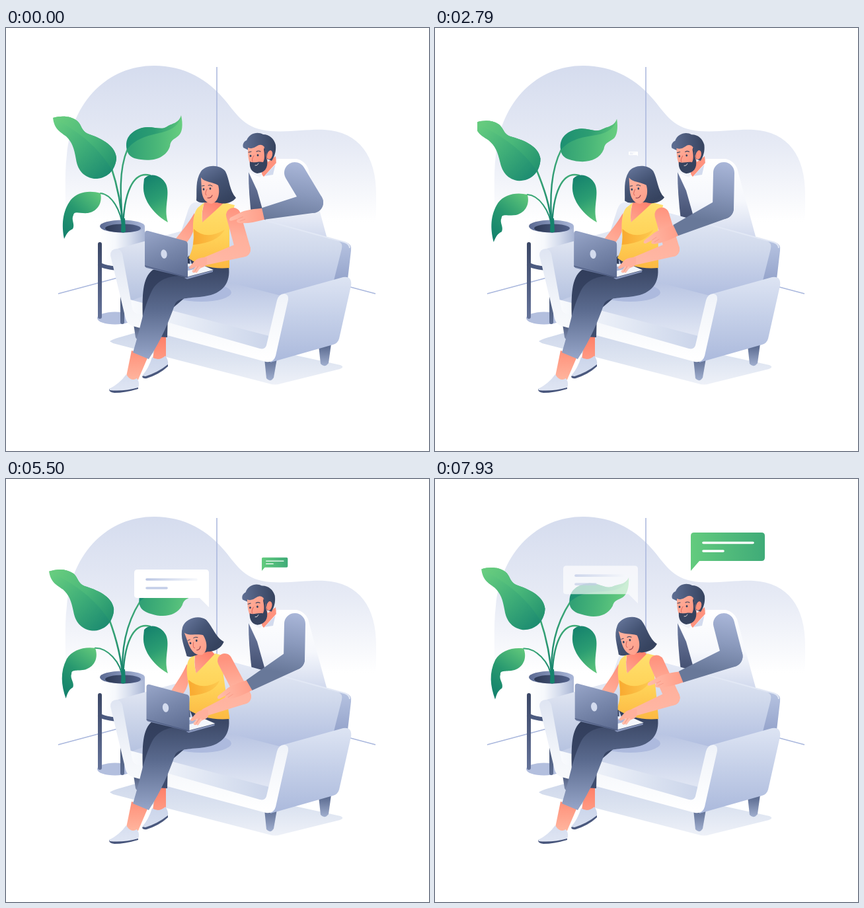
Write an HTML page with a canvas that moves like this. It is 640 px wide and 640 px high and loops after 8 s.

```html
<!DOCTYPE html>
<html lang="en">
<head>
<meta charset="utf-8">
<title>Working from the sofa</title>
<style>
  html, body { margin: 0; width: 100%; height: 100%; overflow: hidden; background: #fff; }
  canvas { display: block; width: 640px; height: 640px; }
</style>
</head>
<body>
<canvas id="stage" width="640" height="640"></canvas>
<script>
const ctx = document.getElementById('stage').getContext('2d');
const LOOP = 8000;
const NAVY = '#36435f', SLATE = '#5f6f94', SKIN = '#ffb09c', BLUSH = '#ff937e';

const smooth = p => (1 - Math.cos(Math.PI * p)) / 2;
const linear = p => p;

// Value of a keyed track at time t; keys are [time, value].
function track(t, keys, ease = smooth) {
  if (t <= keys[0][0]) return keys[0][1];
  for (let i = 1; i < keys.length; i++) {
    const [t0, a] = keys[i - 1], [t1, b] = keys[i];
    if (t <= t1) return a + (b - a) * ease((t - t0) / (t1 - t0));
  }
  return keys[keys.length - 1][1];
}

function grad(x0, y0, x1, y1, ...colors) {
  const g = ctx.createLinearGradient(x0, y0, x1, y1);
  colors.forEach((c, i) => g.addColorStop(i / (colors.length - 1), c));
  return g;
}

const fall = (y0, y1, ...colors) => grad(0, y0, 0, y1, ...colors);
const across = (x0, x1, ...colors) => grad(x0, 0, x1, 0, ...colors);

function fill(path, paint) {
  ctx.fillStyle = paint;
  ctx.fill(new Path2D(path));
}

function line(path, paint, width, cap = 'round') {
  ctx.strokeStyle = paint;
  ctx.lineWidth = width;
  ctx.lineCap = cap;
  ctx.lineJoin = 'round';
  ctx.stroke(new Path2D(path));
}

function oval(x, y, rx, ry, paint, turn = 0) {
  ctx.fillStyle = paint;
  ctx.beginPath();
  ctx.ellipse(x, y, rx, ry, turn, 0, 7);
  ctx.fill();
}

function group(draw) {
  ctx.save();
  draw();
  ctx.restore();
}

function turned(x, y, angle, draw) {
  group(() => {
    ctx.translate(x, y);
    ctx.rotate(angle);
    ctx.translate(-x, -y);
    draw();
  });
}

// Tapered limb through joints given as [x, y, radius].
function limb(joints, paint, flatEnd = false) {
  ctx.fillStyle = paint;
  for (let i = 1; i < joints.length; i++) {
    const [x0, y0, r0] = joints[i - 1], [x1, y1, r1] = joints[i];
    const a = Math.atan2(y1 - y0, x1 - x0), q = Math.PI / 2;
    ctx.beginPath();
    ctx.arc(x0, y0, r0, a + q, a + 3 * q);
    if (flatEnd && i === joints.length - 1) {
      ctx.lineTo(x1 + r1 * Math.sin(a), y1 - r1 * Math.cos(a));
      ctx.lineTo(x1 - r1 * Math.sin(a), y1 + r1 * Math.cos(a));
    } else {
      ctx.arc(x1, y1, r1, a - q, a + q);
    }
    ctx.fill();
  }
}

function room() {
  fill('M90 295C91 260 88 225 92 192C100 110 155 57 224 57C270 57 306 78 332 110C350 132 362 153 400 156C430 158 455 153 482 154C535 157 560 195 560 250L560 295Z',
    fall(57, 293, '#d5dcee', '#e6eaf5', '#ffffff'));
  line('M319 59V300M79 402L180 375M510 389L559 402', '#a9b7dd', 1.5, 'butt');
  fill('M157 474C165 468 185 466 230 450L506 510Q513 513 505 516L416 538Q407 541 398 538L162 477Z',
    fall(460, 540, '#cfd8eb', '#dde4f1', '#eef1f8'));
}

function pot() {
  oval(165, 439, 27, 9.5, '#b3bfde');
  line('M176 362V445', fall(360, 448, NAVY, SLATE), 6);
  line('M142 358Q154 364 180 364', '#4b5a80', 6);
  fill('M142 300V353Q156 361 176 361Q200 360 210 352V300Z', across(142, 212, '#ffffff', '#f6f8fc', '#d3dbec', '#a5b2d2'));
  line('M142 327V437', fall(325, 440, '#3b4766', '#647299'), 6);
  oval(176, 300, 34, 9.5, across(142, 210, '#5a6992', '#8492b6', '#a9b6d8'));
  oval(177, 303, 27, 6.5, across(150, 205, '#2d3954', '#52618a'));
}

const ROOT = { x: 178, y: 308 };

// Stem whose upper end swings about the root while its foot stays put.
function stem(tip, bend, low, angle, width = 2.4) {
  const swing = ([x, y]) => {
    const dx = x - ROOT.x, dy = y - ROOT.y, c = Math.cos(angle), s = Math.sin(angle);
    return [ROOT.x + dx * c - dy * s, ROOT.y + dx * s + dy * c];
  };
  line(`M${swing(tip)}C${swing(bend)} ${low} 177 304`, fall(tip[1], 300, '#3fab77', '#13806c'), width);
}

function plant(t) {
  const grow = track(t, [[0, 0], [7000, 1], [9000, .97]]);
  const sway = track(t, [[0, 0], [3600, -.077], [7300, .004], [8000, -.005]]);
  const droop = -.165 * grow, lift = .17 * grow;
  const leaf = (angle, draw) => turned(ROOT.x, ROOT.y, angle, draw);

  stem([143, 250], [160, 252], [174, 275], droop, 2);
  leaf(droop, () => {
    fill('M88 319C84 298 85 278 98 260C108 248 126 245 143 250C146 263 140 277 124 280C111 281 103 276 102 283C98 290 105 297 101 304C94 307 92 311 88 319Z',
      grad(86, 315, 144, 255, '#12806c', '#27986f', '#5ec57a'));
  });

  stem([184, 183], [170, 215], [173, 255], lift);
  leaf(lift, () => {
    fill('M184 188C179 170 188 156 206 151C222 147 234 156 244 149C252 144 262 144 265 132C268 146 267 158 261 163C254 169 249 169 248 179C242 197 222 202 204 199C194 198 187 195 184 188Z',
      across(183, 267, '#2f9f74', '#48b578', '#68ce80'));
    fill('M183 184C179 168 188 156 206 151C222 147 234 156 244 149C252 144 262 144 265 132C263 146 252 154 236 158C212 163 195 168 183 184Z',
      across(183, 266, '#1d9072', '#2c9d72', '#5bc47b'));
  });

  stem([159, 210], [169, 240], [175, 270], sway, 2.6);
  group(() => {
    ctx.beginPath();
    ctx.rect(64, 60, 300, 300);
    ctx.clip();
    leaf(sway, () => {
      const top = 'M71 136C84 132 98 133 107 140C115 146 113 155 124 160C141 166 165 176 167 196';
      fill(top + 'C166 218 150 229 133 228C115 225 108 212 106 199C103 181 100 173 91 164C80 156 73 152 71 136Z',
        grad(78, 135, 155, 225, '#68ce80', '#3fae78', '#1b8a70'));
      fill(top + 'C167 204 164 209 160 214C146 191 122 162 71 136Z',
        grad(85, 133, 165, 205, '#66cb7e', '#4ab87a', '#24946f'));
    });
  });

  stem([218, 223], [192, 216], [178, 250], 0);
  fill('M209 228C219 217 236 224 242 236C249 252 238 272 245 294C227 284 206 262 208 238Z',
    grad(210, 226, 246, 292, '#15826d', '#2b9d72', '#60c77c'));
  fill('M174 308L175 288L180 288L181 308Q177 311 174 308Z', '#15836d');
}

function manBody() {
  fill('M367 218L384 226L410 198L440 198Q452 201 457 212L489 330H385L372 270Z',
    fall(200, 325, '#ffffff', '#f5f7fc', '#ccd5eb'));
  fill('M367 218L380 246L393 292L372 290Q367 250 367 218Z', fall(218, 290, '#6f7da2', '#434f70'));
  fill('M393 205L408 194L409 204L390 225Q386 222 387 215Z', BLUSH);
  fill('M410 196L404 222L391 224L408 206Z', '#d3dbee');
}

function manHead(t) {
  const tilt = track(t, [[1500, 0], [2790, -.02], [3700, -.075], [5500, -.04], [6790, -.018], [7900, 0]]);
  turned(398, 208, tilt, () => {
    fill('M359 181C357 175 361 171 364 170C368 159 381 156 389 161C399 161 406 168 408 177C409 187 406 195 402 201L392 197Z',
      across(358, 408, SLATE, NAVY));
    fill('M366 181Q372 184 379 179Q386 174 391 180L397 206L370 207C366 198 366 190 366 181Z', grad(366, 180, 394, 205, SKIN, BLUSH));
    oval(399, 192, 4, 7, BLUSH, .25);
    fill('M391 180C394 188 393 196 395 200C397 212 391 219 380 220C371 218 368 211 369 202C374 205 383 201 389 203C392 198 391 190 390 184Z', NAVY);
    line('M377 208Q380 209 382 205', '#f6e3e0', .9);
    line('M375 193Q371 199 373 202', '#d8655c', 1);
    line('M367 188L371 187M379 187Q382 185 385 187', NAVY, 1.1);
    oval(370, 193.5, 1.4, 1.7, NAVY);
    oval(381, 192.5, 1.4, 1.7, NAVY);
  });
}

function sofa() {
  fill('M391 500L410 500L405 529Q400 537 394 530Z', fall(500, 534, '#5f6f94', '#a2b0d0'));
  fill('M473 480L492 478L488 507Q482 515 476 508Z', fall(483, 512, '#5f6f94', '#a2b0d0'));
  fill('M193 448L206 450L201 470Q198 473 196 468Z', fall(450, 472, '#4d5b7e', '#8492b4'));
  fill('M490 318L514 324Q524 327 522 337L517 380L494 390Z', fall(325, 385, '#b5c2e0', '#93a2ca'));
  fill('M258 330L276 274Q280 261 292 264L502 322Q510 325 508 334L494 390L413 408L250 366Z',
    fall(265, 405, '#e9edf7', '#d0d9ec', '#b1bee0'));
  line('M292 264L512 324Q519 326 520 332', '#e2e8f5', 2);
  fill('M185 405L250 362L416 405L400 468L190 413Z', fall(375, 462, '#b4c0e0', '#c9d3ea', '#dfe5f3'));
  fill('M165 335L270 306L262 385L188 413Z', fall(315, 412, '#e2e7f3', '#b6c3e0'));
  fill('M188 411L402 467L394 488L186 434Z', across(190, 398, '#f8fafd', '#e2e8f4', '#cbd5ea'));
  oval(295, 400, 46, 14, '#adbade');
  fill('M420 402L510 377Q524 375 522 390L504 470Q502 477 495 479L400 506Z', fall(377, 500, '#dde4f3', '#c4cfe8', '#adbbdd'));
  fill('M158 344Q158 334 168 334Q174 335 176 342L191 424Q192 430 198 432L384 485Q392 487 394 480L410 412Q413 402 421 402Q428 403 427 411L408 496Q405 507 393 505L192 451Q183 448 181 440Z',
    fall(334, 500, '#dfe5f2', '#f2f5fa', '#ffffff'));
}

function legs() {
  const shoe = fall(500, 548, '#ccd6eb', '#dfe5f3');
  const ankle = fall(465, 530, '#ff7d66', '#ffb39c');
  fill('M228 464L242 465L242 498Q234 506 222 500Z', ankle);
  fill('M206 527L245 507L245 512Q232 524 213 530Q207 531 206 527Z', '#4a587d');
  fill('M206 526Q216 515 221 498Q231 505 241 496Q246 502 245 509Q230 521 211 527Z', shoe);
  fill('M190 488L215 497L200 532Q190 536 182 527Z', ankle);
  fill('M156 546L200 541L200 546Q180 552 164 552Q155 551 156 546Z', '#46547a');
  fill('M156 546Q172 538 182 524Q189 536 198 530Q203 537 200 544Q178 550 157 548Z', shoe);
  fill('M207 440C206 405 206 378 222 366L278 345L280 400L245 430L244 468L226 467Z', fall(350, 468, '#2f3b58', '#3f4d6f'));
  fill('M276 344Q300 362 337 361C340 385 329 402 300 406C280 409 262 407 256 417C246 445 236 470 216 501L192 491C205 450 207 425 221 397C230 380 248 374 270 375L283 362Z',
    fall(350, 500, '#323e5b', '#5a6a8e', '#96a5c8'));
}

function laptop(lean) {
  group(() => {
    ctx.translate(2.5 * lean, 4 * lean);
    fill('M270 378L313 367V369L274 380Z', '#8997bd');
    fill('M272 377L314 366L298 359L272 356Z', '#f3f6fb');
    fill('M272 368L292 363L284 360L272 361Z', '#a9b6d8');
    fill('M210 311Q210 306 215 307L271 322Q275 323 275 328V378L213 363Q210 362 210 359Z',
      grad(225, 308, 255, 380, '#93a1c4', '#7786aa', '#5e6d92'));
    line('M210.5 360L274 377', '#4c5a80', 1.2);
    oval(239, 342, 4.6, 6.8, '#d3dbee', -.15);
  });
}

function womanTorso(lean) {
  const slant = .142 * lean;
  group(() => {
    ctx.transform(1, 0, slant, 1, -360 * slant, 0);
    fill('M285 280C276 296 265 308 256 320L270 328C279 320 284 308 286 298Z', grad(284, 285, 260, 325, BLUSH, SKIN));
    fill('M302 258L322 256L330 266L297 296Q295 276 302 258Z', grad(320, 262, 298, 292, '#ff816d', '#ffa48f'));
    fill('M290 272L300 264Q295 278 297 294Q312 281 330 264L346 268L338 295V363Q300 366 276 348Q286 330 283 306Q282 282 290 272Z',
      fall(265, 363, '#ffdf6e', '#ffd358', '#fcb943'));
    fill('M284 304Q303 322 331 305Q320 325 283 328Q285 316 284 304Z', across(284, 330, '#f9aa31', '#fdca50'));
  });
}

function womanArm(t, lean) {
  const shoulder = [344 - 13 * lean, 283 - 8 * lean, 11];
  const elbow = [358.5 + lean, 335 - 6 * lean, 11.5];
  limb([shoulder, elbow, [301, 353, 6]], grad(shoulder[0], 272, 335, 355, BLUSH, SKIN, '#ffb7a4'));
  const tap = Math.sin(t / 110) * .8;
  group(() => {
    ctx.translate(2 * lean, 2 * lean);
    fill('M304 347Q290 346 284 354L277 362Q277 365 281 364L287 361L282 369Q284 372 288 368L295 363Q304 360 304 356Z', SKIN);
    line(`M288 362L283 ${368 + tap}M293 362L288 ${369 - tap}`, '#ffc0ae', 3);
    line(`M290 361L286 ${367 + tap}`, '#ee8d7c', .7);
  });
}

function womanHead(lean) {
  group(() => {
    ctx.translate(312 - 13.5 * lean, 268 - .5 * lean);
    ctx.rotate(-.3 * lean);
    ctx.translate(-312, -268);
    fill('M288 261C289 246 286 231 295 217C303 206 324 206 332 217C338 228 338 247 348 257C341 266 328 267 320 264L300 264Q293 265 288 261Z',
      grad(300, 208, 330, 262, '#65759a', '#445373', NAVY));
    fill('M295 226C299 233 313 233 321 238C324 248 322 263 311 266C301 265 297 256 296 246Z', grad(297, 235, 320, 262, SKIN, '#ffa08b'));
    line('M304 244Q300 251 303 253', '#d8655c', 1);
    line('M305 257Q310 258 312 253', '#96434c', 1.1);
    line('M296.5 239L300 238.5M306 238Q309 236.5 312 239', NAVY, 1);
    oval(299, 244, 1.4, 1.7, NAVY);
    oval(309, 243, 1.4, 1.7, NAVY);
  });
}

function manArm(t) {
  const at = (...keys) => track(t, keys);
  const ex = at([0, 464], [2650, 436], [6800, 436], [9000, 462]);
  const ey = at([0, 264], [2650, 273], [6800, 273], [9000, 264]);
  const wx = at([0, 389], [2700, 364], [3650, 371], [5500, 368], [6750, 365], [9200, 380]);
  const wy = at([0, 281], [2700, 306], [3650, 314], [5500, 312], [6750, 306], [9200, 292]);
  const aim = at([0, -.12], [1290, -.15], [2790, -.31], [3650, -.43], [5500, -.33], [6790, -.31], [8200, -.16]);
  group(() => {
    ctx.translate(wx, wy);
    ctx.rotate(aim);
    fill('M6 -8C-14 -9 -27 -9 -36 -5L-50 0Q-54 4 -49 5L-38 3Q-45 8 -36 10Q-20 13 6 8Z', across(-50, 4, '#ffbba8', '#ff9d88'));
    line('M-38 3L-31 1M-36 7L-28 5', '#f79482', .7);
  });
  limb([[437, 219, 16], [ex, ey, 16], [wx, wy, 9]], grad(440, 204, 425, 294, '#a9b6d8', '#8a99bc', '#687899'), true);
}

function popScale(u) {
  return track(u, [[0, .05], [370, .35], [870, .808], [1200, 1.03], [1400, 1.062], [1660, 1.045], [2300, 1]], linear);
}

function bubble(x, y, scale, draw) {
  group(() => {
    ctx.translate(x, y);
    ctx.scale(scale, scale);
    draw();
  });
}

function bubbles(t) {
  if (t > 2700) {
    const leave = track(t, [[7600, 0], [8400, 1]]);
    ctx.globalAlpha = 1 - .9 * leave;
    bubble(307, 194 - 16 * leave, popScale(t - 2700), () => {
      fill('M-108 -57H-5Q0 -57 0 -52V0L-14 -14H-108Q-113 -14 -113 -18V-52Q-113 -57 -108 -57Z', '#fff');
      line('M-94 -42H-19', across(-96, -18, '#b9c5e3', '#f6f8fc'), 3.6);
      line('M-94 -29H-64', '#c3cee8', 3.6);
    });
    ctx.globalAlpha = 1;
  }
  if (t > 5130) {
    bubble(387, 139, popScale(t - 5130), () => {
      fill('M5 -58H107Q112 -58 112 -53V-20Q112 -15 107 -15H13L0 0V-53Q0 -58 5 -58Z', across(0, 112, '#63cb7e', '#3fab78'));
      line('M19 -42.5H94M19 -30H49', '#fff', 3.6);
    });
  }
}

function render(t) {
  const lean = track(t, [[2500, 0], [4400, 1], [7200, 1], [9100, 0]]);
  ctx.clearRect(0, 0, 640, 640);
  room();
  pot();
  plant(t);
  manBody();
  manHead(t);
  sofa();
  legs();
  womanTorso(lean);
  laptop(lean);
  womanArm(t, lean);
  womanHead(lean);
  manArm(t);
  bubbles(t);
}

const start = performance.now();
function tick() {
  render((performance.now() - start) % LOOP);
  requestAnimationFrame(tick);
}
tick();
</script>
</body>
</html>
```
